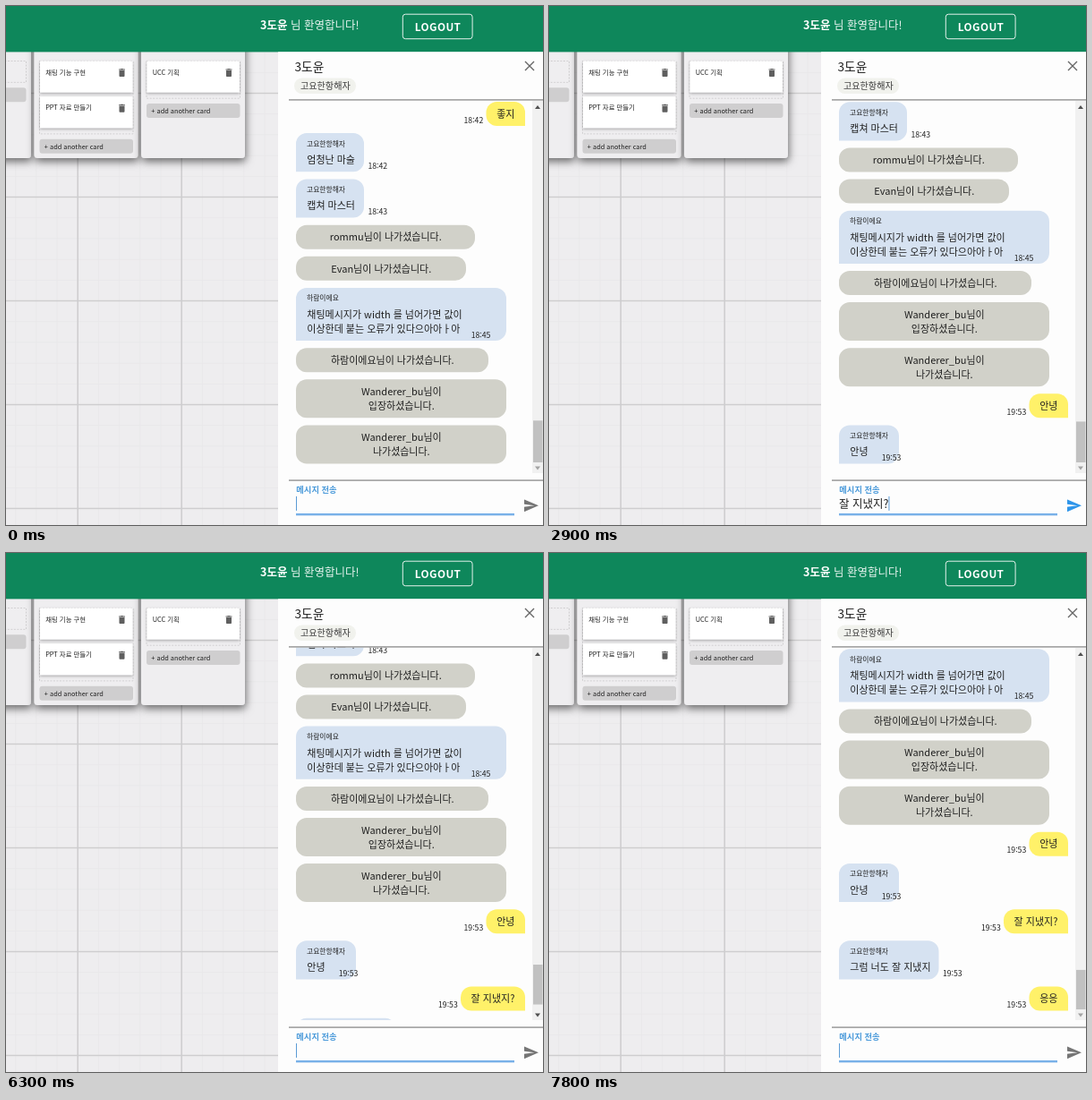
These frames come from a looping animation (600 px wide and 580 px high, 7.9 s). An HTML page:

```html
<!DOCTYPE html>
<html lang="ko">
<head>
<meta charset="utf-8">
<title>Chat board</title>
<style>
html, body { margin: 0; width: 100%; height: 100%; overflow: hidden; background: #fdfdfd; }
svg { display: block; width: 600px; height: 580px; }
text { font-family: "Noto Sans CJK KR", "Noto Sans KR", "Noto Sans CJK JP", sans-serif; fill: #202020; white-space: pre; }
.mid { text-anchor: middle; }
</style>
</head>
<body>
<svg viewBox="0 0 600 580">
  <defs>
    <filter id="deep" x="-20%" y="-20%" width="140%" height="140%">
      <feDropShadow dx="1" dy="4" stdDeviation="5" flood-opacity=".55"/>
    </filter>
    <filter id="soft" x="-20%" y="-20%" width="140%" height="150%">
      <feDropShadow dx="0" dy="1.5" stdDeviation="1.5" flood-opacity=".3"/>
    </filter>
    <clipPath id="view"><rect x="305" y="105.5" width="283" height="416.5"/></clipPath>
    <clipPath id="boardView"><rect width="304" height="580"/></clipPath>
    <path id="trash" fill="#5f5f5f" transform="scale(.5)" d="M6 19c0 1.1.9 2 2 2h8c1.1 0 2-.9 2-2V7H6v12zM19 4h-3.5l-1-1h-5l-1 1H5v2h14V4z"/>
  </defs>

  <g clip-path="url(#boardView)">
    <rect width="304" height="580" fill="#eeedef"/>
    <path id="minor" stroke="#e9e8ea"/>
    <path id="major" stroke="#cecdcf" stroke-width="1.5"/>
    <g id="board"></g>
  </g>

  <rect width="600" height="51.4" fill="#0e875b"/>
  <text x="284" y="26" font-size="12.5" style="fill:#fff"><tspan font-weight="700">3도윤</tspan><tspan font-weight="500" fill-opacity=".9"> 님 환영합니다!</tspan></text>
  <rect x="443.3" y="9.2" width="77.8" height="27.5" rx="3" fill="none" stroke="#e3f1eb"/>
  <text class="mid" x="482.6" y="27.6" font-size="11.8" font-weight="700" letter-spacing=".4" style="fill:#fff">LOGOUT</text>

  <rect x="304" y="51.4" width="296" height="529" fill="#fdfdfd"/>
  <text x="322.5" y="73" font-size="13.7">3도윤</text>
  <path d="M580 62l10 10M590 62l-10 10" stroke="#666" stroke-width="1.4"/>
  <rect x="322" y="80.5" width="69" height="17.5" rx="8.7" fill="#f1f2ed"/>
  <text x="329" y="93.2" font-size="10.1" style="fill:#3a3a3a">고요한항해자</text>

  <g clip-path="url(#view)"><g id="log"></g></g>

  <rect x="588" y="106" width="12" height="416" fill="#f1f1f1"/>
  <path d="M591 115l3-4 3 4z" fill="#505050"/>
  <path id="down" d="M591 514.5l3 4 3-4z"/>
  <rect id="thumb" x="589" width="10.5" fill="#c1c1c1"/>
  <path d="M316 104.8H600M316 530.2H600" stroke="#a8a8a8" stroke-width="1.7"/>

  <text x="324.3" y="543.5" font-size="9.3" font-weight="700" style="fill:#4a9ada">메시지 전송</text>
  <text id="draft" x="324" y="560.8" font-size="12.5"></text>
  <rect id="caret" y="548" width="1" height="16" fill="#5b9bd5"/>
  <rect x="324" y="567" width="244" height="2.4" fill="#78b0e8"/>
  <path id="send" transform="translate(577.5 549.2) scale(.76)" d="M2 21L23 12 2 3v7l15 2-15 2z"/>
</svg>
<script>
const LOOP = 7900;
const $ = id => document.getElementById(id);

const label = (x, y, size, s, cls = '') =>
  `<text x="${x}" y="${y}" font-size="${size}" class="${cls}">${s}</text>`;

// ---- board ----
function grid(step) {
  let d = '';
  for (let x = 80.2 % step; x < 304; x += step) d += `M${x} 0V580`;
  for (let y = 213.5 % step; y < 580; y += step) d += `M0 ${y}H304`;
  return d;
}
$('minor').setAttribute('d', grid(23.2));
$('major').setAttribute('d', grid(116));

function column(x, cards) {
  const top = 61.5, pitch = 39.7, w = 104.5;
  const h = (cards.length || .55) * pitch + 2, button = top + h + 5.8;
  let s = `<rect x="${x}" y="30" width="116" height="140" rx="4" fill="#efeef0" filter="url(#deep)"/>
    <rect x="${x + 6}" y="${top}" width="${w}" height="${h}" fill="none" stroke="#c9c8c9" stroke-width=".8" stroke-dasharray="2 1.5"/>`;
  cards.forEach((name, i) => {
    const y = top + i * pitch;
    s += `<rect x="${x + 6.5}" y="${y}" width="${w - 1}" height="35" fill="#fff" filter="url(#soft)"/>
      ${label(x + 12.7, y + 15.2, 7.4, name)}
      <use href="#trash" x="${x + 92}" y="${y + 7}"/>`;
  });
  return s + `<rect x="${x + 6}" y="${button}" width="${w}" height="16" rx="3" fill="#cfcecf"/>
    ${label(x + 11.3, button + 10.8, 7.4, '+ add another card')}`;
}
$('board').innerHTML = column(-88, []) +
  column(31.5, ['채팅 기능 구현', 'PPT 자료 만들기']) + column(151, ['UCC 기획']);

// ---- messages ----
function bubble(x, y, w, h, color, bl = 12, br = 12) {
  const r = 12;
  return `<path fill="${color}" d="M${x + r} ${y}h${w - 2 * r}a${r} ${r} 0 0 1 ${r} ${r}v${h - r - br}
    a${br} ${br} 0 0 1 ${-br} ${br}h${br + bl - w}a${bl} ${bl} 0 0 1 ${-bl} ${-bl}v${bl + r - h}
    a${r} ${r} 0 0 1 ${r} ${-r}z"/>`;
}
const lines = (x, y, rows, cls) => rows.map((s, i) => label(x, y + 16 * i, 11, s, cls)).join('');

const mine = (text, time, w) => ({ h: 27, draw: y =>
  bubble(580 - w, y, w, 27, '#fff169', 12, 0) +
  lines(580 - w / 2, y + 17.7, [text], 'mid') + label(555 - w, y + 23.7, 8.7, time) });

const theirs = (name, rows, time, w, timeX = 328.4 + w) => {
  const h = 27.2 + 16 * rows.length;
  return { h, draw: y => bubble(324, y, w, h, '#d6e2f1', 0) + label(336, y + 14.4, 7.8, name) +
    lines(336.3, y + 34, rows) + label(timeX, y + h - 3.2, 8.7, time) };
};

const notice = (rows, w) => {
  const h = 11 + 16 * rows.length;
  return { h, draw: y => bubble(324, y, w, h, '#d1d1c9') + lines(324.3 + w / 2, y + 17.7, rows, 'mid') };
};

const host = '고요한항해자';
const messages = [
  mine('좋지', '18:42', 43.5),
  theirs(host, ['엄청난 마술'], '18:42', 76),
  theirs(host, ['캡쳐 마스터'], '18:43', 76),
  notice(['rommu님이 나가셨습니다.'], 200),
  notice(['Evan님이 나가셨습니다.'], 190),
  theirs('하람이에요', ['채팅메시지가 width 를 넘어가면 값이', '이상한데 붙는 오류가 있다으아아ㅏ아'], '18:45', 235, 519.7),
  notice(['하람이에요님이 나가셨습니다.'], 215),
  notice(['Wanderer_bu님이', '입장하셨습니다.'], 235),
  notice(['Wanderer_bu님이', '나가셨습니다.'], 235),
  mine('안녕', '19:53', 43.5),
  theirs(host, ['안녕'], '19:53', 67, 371.7),
  mine('잘 지냈지?', '19:53', 72),
  theirs(host, ['그럼 너도 잘 지냈지'], '19:53', 111.5),
  mine('응응', '19:53', 43.5)
];
const HISTORY = 9;
const offsets = [0];   // scroll offset once n new messages are in view
let nextY = 107;
$('log').innerHTML = messages.map((m, i) => {
  const s = `<g>${m.draw(nextY)}</g>`;
  if (i >= HISTORY) offsets.push(nextY + m.h - 511.6);
  nextY += m.h + 8.1;
  return s;
}).join('');
const added = [...$('log').children].slice(HISTORY);

// ---- timeline ----
const arrivals = [400, 2100, 3300, 6300, 7600];
const SCROLL_LAG = 100;
const typing = (start, steps) => steps.map((s, i) => [start + i * 100, s]);
const drafts = [
  [7600 - LOOP, ''],
  ...typing(100, ['아', '안녀', '안녕']), [400, ''],
  ...typing(2200, ['자', '잘', '잘 ', '잘 지', '잘 지내', '잘 지냈', '잘 지냈지', '잘 지냈지?']), [3300, ''],
  ...typing(7000, ['ㅇ', '으', '응', '응ㅇ', '응으', '응응']), [7600, '']
];
const count = t => arrivals.filter(a => a <= t).length;

function render() {
  const t = performance.now() % LOOP;
  const shown = count(t), seen = count(t - SCROLL_LAG);
  added.forEach((g, i) => g.setAttribute('visibility', i < shown ? 'visible' : 'hidden'));
  $('log').setAttribute('transform', `translate(0 ${-offsets[seen]})`);

  const total = 3500 + offsets[shown], scale = 392 / total, h = 417 * scale;
  $('thumb').setAttribute('height', h);
  $('thumb').setAttribute('y', 118 + (3500 + offsets[seen]) * scale - h);
  $('down').setAttribute('fill', seen < shown ? '#505050' : '#a3a3a3');

  const [key, text] = drafts.filter(d => d[0] <= t).pop();
  const draft = $('draft');
  if (draft.textContent !== text) draft.textContent = text;
  $('caret').setAttribute('x', 324 + (text ? draft.getComputedTextLength() : 0));
  $('caret').setAttribute('visibility', (t - key) % 1000 < 500 ? 'visible' : 'hidden');
  $('send').setAttribute('fill', text ? '#2e95ea' : '#757575');
  requestAnimationFrame(render);
}
render();
</script>
</body>
</html>
```
